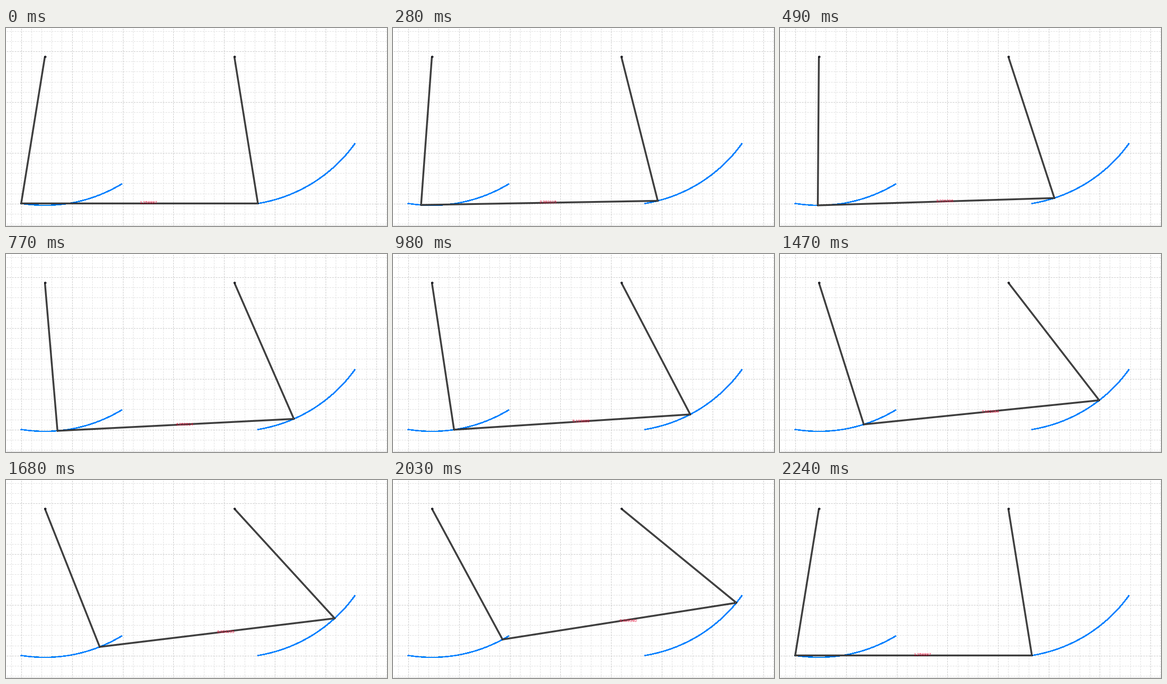
These frames come from a looping animation (720x374 px, 2.45 s). A matplotlib script:

```python
import numpy as np
import matplotlib.pyplot as plt
from matplotlib.animation import FuncAnimation

W, H, DPI = 720, 374, 100
PX = 72 / DPI
STEPS, HOLD, DT = 32, 3, 70

# Four-bar linkage, in pixels
A = np.array([73.0, 53.7])
B = np.array([431.0, 53.7])
CRANK, COUPLER = 280.8, 447.3

# Horizontal position of the right joint over time
KEY_T = [0, 7, 8, 11, 16, 17, 24, 29, 31]
KEY_X = [475.5, 518, 524.3, 543.5, 573, 579, 620.6, 648.4, 658.5]


def right_joint(t):
    x = np.interp(t, KEY_T, KEY_X)
    return np.array([x, B[1] + np.sqrt(CRANK**2 - (x - B[0])**2)])


def left_joint(right):
    d = right - A
    dist = np.hypot(*d)
    ux, uy = d / dist
    a = (CRANK**2 - COUPLER**2 + dist**2) / (2 * dist)
    h = np.sqrt(CRANK**2 - a**2)
    return A + a * np.array([ux, uy]) + h * np.array([-uy, ux])


fig = plt.figure(figsize=(W / DPI, H / DPI), dpi=DPI, facecolor="white")
ax = fig.add_axes([0, 0, 1, 1])
ax.set_xlim(-0.5, W - 0.5)
ax.set_ylim(H - 0.5, -0.5)
ax.axis("off")


def draw_grid(x0=28.2, y0=331.3, gap=19.18):
    for k in range(-18, 37):
        major = k % 5 == 0
        style = dict(color="#c8c8c8" if major else "#e0e0e0", lw=PX,
                     ls=(0, (3, 2)), zorder=1 if major else 0)
        x, y = x0 + k * gap, y0 + k * gap
        if 0 <= x < W:
            ax.plot([x, x], [0, H], **style)
        if 0 <= y < H - 1:
            ax.plot([0, W], [y, y], **style)
    ax.plot([0, W], [373, 373], color="#d8d8d8", lw=PX, zorder=1)


def make_bar():
    shell, = ax.plot([], [], color="black", lw=3.1 * PX, zorder=3,
                     solid_capstyle="round")
    core, = ax.plot([], [], color="#909090", lw=0.9 * PX, zorder=4,
                    solid_capstyle="butt")
    return shell, core


draw_grid()

rights = np.array([right_joint(t) for t in np.linspace(0, STEPS - 1, 120)])
lefts = np.array([left_joint(p) for p in rights])
for path in (lefts, rights):
    ax.plot(*path.T, color="#0080ff", lw=1.5 * PX, zorder=2,
            antialiased=False)

bars = [make_bar() for _ in range(3)]
for p in (A, B):
    ax.plot(*p, "o", ms=3 * PX, mfc="#50506a", mec="black",
            mew=PX, zorder=5)

label = ax.text(0, 0, "", color="#e8143c", fontsize=8 * PX, zorder=6,
                family="Liberation Sans", ha="left", va="baseline")


def update(i):
    t = i if i < STEPS else 0
    right = right_joint(t)
    left = left_joint(right)
    for bar, (p, q) in zip(bars, ((A, left), (B, right), (left, right))):
        for line in bar:
            line.set_data([p[0], q[0]], [p[1], q[1]])
    mid = (left + right) / 2
    label.set_position((mid[0], mid[1] + 1))
    label.set_text(f"{1.258887 + 0.281057 * t:.6f}")
    return [line for bar in bars for line in bar] + [label]


anim = FuncAnimation(fig, update, frames=STEPS + HOLD, interval=DT,
                     repeat=True, repeat_delay=0, blit=False)
plt.show()
```
